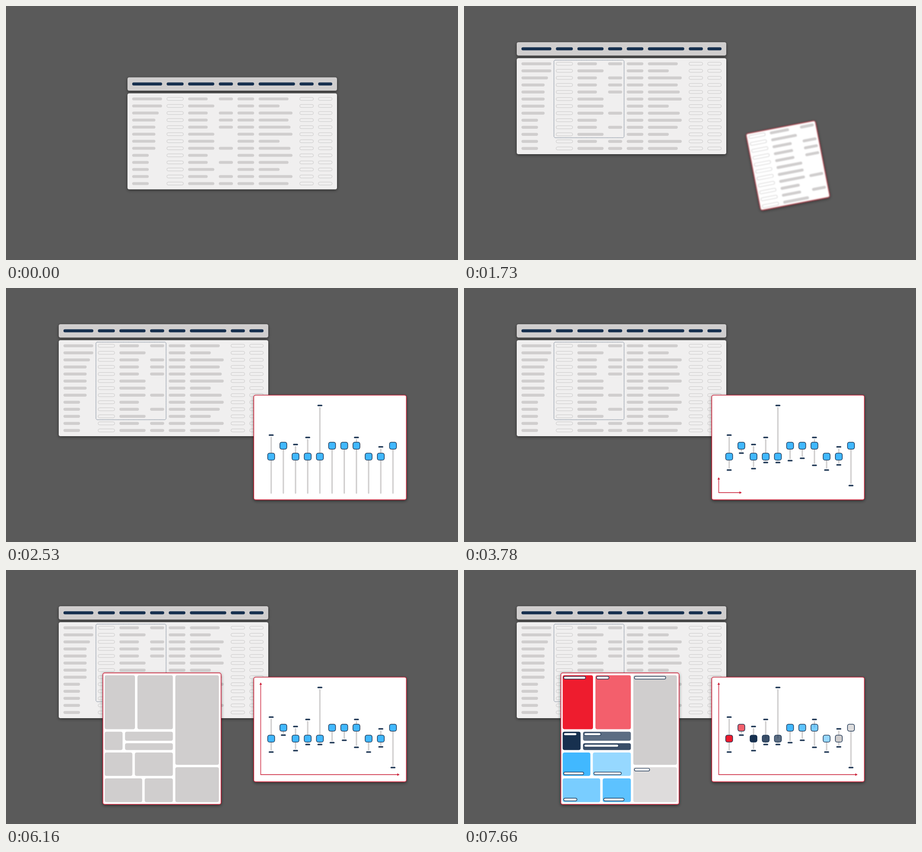
These frames come from a looping animation (960x540 px, 8 s). An HTML page:

```html
<!DOCTYPE html>
<html lang="en">
<head>
<meta charset="utf-8">
<title>Table to charts</title>
<style>
  html, body { margin: 0; width: 100%; height: 100%; overflow: hidden; background: #5a5a5a; }
  svg { display: block; width: 100vw; height: 100vh; }
</style>
</head>
<body>
<svg viewBox="0 0 960 540">
  <defs>
    <filter id="shadow" x="-10%" y="-20%" width="120%" height="145%">
      <feDropShadow dx="0" dy="2" stdDeviation="3" flood-color="#000" flood-opacity=".5"/>
    </filter>
    <filter id="tableBlur"><feGaussianBlur stdDeviation="0"/></filter>
    <filter id="cardBlur"><feGaussianBlur stdDeviation="0"/></filter>
  </defs>
  <g id="table">
    <g id="sheet"></g>
    <g id="marks"></g>
  </g>
  <g id="card"></g>
  <g id="map"></g>
</svg>
<script>
const LOOP = 8000, STEP = 50, ROWS = 13, PICKED = 11;
const GREY = '#d0cece', NAVY = '#17304f', BLUE = '#41b8ff', RED = '#ee1c2e';
const LINE = '#cc2039', PAPER = '#f0efef', WHITE = '#ffffff';
const SEL = { x: 191, y: 115, w: 149, h: 165 };
const MID = { x: SEL.x + SEL.w / 2, y: SEL.y + SEL.h / 2 };

const $ = id => document.getElementById(id);
const each = (n, draw) => Array.from({ length: n }, (_, i) => draw(i)).join('');
const lerp = (a, b, p) => a + (b - a) * p;
const lerpAll = (a, b, p) => a.map((v, k) => lerp(v, b[k], p));
const mix = (a, b, p) => {
  const part = (c, k) => parseInt(c.slice(1 + 2 * k, 3 + 2 * k), 16);
  return `rgb(${[0, 1, 2].map(k => Math.round(lerp(part(a, k), part(b, k), p)))})`;
};

const ease = (u, e) => u < .5 ? .5 * (2 * u) ** e : 1 - .5 * (2 - 2 * u) ** e;
// Share of a stepped move whose first and last changes fall at the given times
const share = (t, first, last) => {
  const n = Math.round((last - first) / STEP) + 1;
  return Math.max(0, Math.min(n, Math.floor((t - first) / STEP) + 1)) / n;
};
const move = (t, first, last, e = 2) => ease(share(t, first, last), e);

// Columns follow each other with an even gap
let edge = 122;
const COLS = [63.6, 36, 55.6, 30, 35.4, 77.2, 30, 30].map(w => {
  const x = edge;
  edge += w + 9.6;
  return { x, w };
});
const [NAME, TAG, BAR, EXTRA, CODE, NOTE, ...FLAGS] = COLS;

// Cell widths count letters
const LETTER = 7.05;
const LONG = new Set([1, 5, 6, 7, 10, 12]);
const BARE = new Set([1, 5, 6, 8, 10]);
const rowY = i => 122.8 + 15 * i;
const barLen = i => LETTER * (LONG.has(i) ? 7.9 : 5.9);
const nameLen = i => LETTER * Math.max(i < 8 ? 7 : 5, Math.round(9.4 - .7 * i));
const noteLen = i => LETTER * (Math.abs((2 * i + 1) % 9 - 3.5) < 1 ? 6.3 : 9 + .6 * (i % 3));

// Shades: each family fades as it goes on
const SHADES = [[RED, 2], [NAVY, 3], [BLUE, 4], [GREY, 2]].flatMap(([base, n]) =>
  Array.from({ length: n }, (_, k) => ({ base, alpha: 1 - k * (n > 2 ? .15 : .3) })));

// Treemap: nested rows and columns, each area in proportion to its value
const VALUES = [83, 96, 19, 21, 26, 35, 36, 47, 47, 190, 77];
const TREE = [[[0, 1], [2, [4, 3]], [5, 8], [7, 6]], [9, 10]];
const GAP = 5.2;
const TILES = [];
const sum = node => Array.isArray(node) ? node.reduce((s, n) => s + sum(n), 0) : VALUES[node];
function slice(node, x, y, w, h, across = true) {
  if (!Array.isArray(node)) {
    TILES[node] = [x + GAP / 2, y + GAP / 2, w - GAP, h - GAP];
    return;
  }
  const total = sum(node);
  for (const child of node) {
    const part = sum(child) / total;
    const cw = across ? w * part : w, ch = across ? h : h * part;
    slice(child, x, y, cw, ch, !across);
    if (across) x += cw; else y += ch;
  }
}
slice(TREE, 207, 221.2, 247.7, 274.8);

// Chart: whisker ends around each knob
const HIGH = { 0: 313, 2: 333, 3: 318, 4: 250, 7: 318, 9: 338 };
const LOW = [387, 351, 384, 371, 371, 367, 362, 377, 387, 376, 420];

const rect = (x, y, w, h, r, attrs) =>
  `<rect x="${x}" y="${y}" width="${w}" height="${h}" rx="${r}" ${attrs}/>`;
const pill = (x, cy, w, fill = GREY, h = 6.2) => rect(x, cy - h / 2, w, h, h / 2, `fill="${fill}"`);
const hollow = ({ x, w }, cy) => rect(x + .4, cy - 3.2, w - .8, 6.4, 3.2, 'fill="none" stroke="#cbcaca"');
const panel = (x, y, w, h, fill) =>
  rect(x, y, w, h, 4, `fill="${fill}" stroke="${LINE}" stroke-width="1.4" filter="url(#shadow)"`);
const side = i => hollow(TAG, rowY(i)) + (BARE.has(i) ? '' : pill(EXTRA.x, rowY(i), EXTRA.w));
const bar = i => pill(BAR.x, rowY(i), barLen(i));

$('sheet').innerHTML =
  rect(112, 77, 445, 28.3, 4, `fill="${GREY}" filter="url(#shadow)"`) +
  rect(112, 111, 445, 204, 4, `fill="${PAPER}" filter="url(#shadow)"`) +
  COLS.map(({ x, w }) => pill(x, 91, w, NAVY, 6.5)).join('') +
  each(ROWS, i => {
    const y = rowY(i);
    return pill(NAME.x, y, nameLen(i)) + side(i) + bar(i) + pill(CODE.x, y, CODE.w) +
      pill(NOTE.x, y, noteLen(i)) + FLAGS.map(col => hollow(col, y)).join('');
  });

// Red outline growing both ways from the top right corner
function trace(p) {
  const { x, y, w, h } = SEL, r = x + w, b = y + h;
  const style = `fill="none" stroke="${LINE}" stroke-width="1.5" pathLength="1" stroke-dasharray="${p} 2"`;
  return `<path d="M${r - 1} ${y + 1}Q${r - 2} ${y} ${r - 4} ${y}H${x + 3}Q${x} ${y} ${x} ${y + 3}V${b - 1}" ${style}/>` +
    `<path d="M${r - 1} ${y + 1}Q${r} ${y + 2} ${r} ${y + 4}V${b - 3}Q${r} ${b} ${r - 3} ${b}H${x + 1}" ${style}/>`;
}

function marks(t) {
  const { x, y, w, h } = SEL;
  let out = '';
  if (t >= 630) out += rect(x, y, w, h, 3, `fill="none" stroke="${NAVY}" stroke-dasharray="1 1.2"`);
  if (t >= 330 && t < 930) out += trace(move(t, 330, 630, 1.25));
  if (t >= 5360 && t < 5910) out += trace(move(t, 5360, 5710, 1.25));
  return out;
}

function copy(t, slide) {
  const { x, y, w, h } = SEL;
  const turn = -90 * move(t, 1730, 1930, 1.54);
  return `<g transform="translate(${lerp(146, 422.5, slide)} ${lerp(74.7, 141.5, slide)}) rotate(${turn} ${MID.x} ${MID.y})">` +
    panel(x, y, w, h, mix(PAPER, WHITE, Math.max(0, slide * 2 - 1))) +
    each(PICKED, i => side(i) + bar(i)) + '</g>';
}

// A row turned upright becomes a knob with whiskers
function column(i, m, s, c) {
  const x = lerp(614 + 15 * i, 563.2 + 25.87 * i, m);
  const box = (cy, w, h, r, attrs) => rect(x - w / 2, cy - h / 2, w, h, r, attrs);
  const len = barLen(i), { base, alpha } = SHADES[i];
  const goal = LONG.has(i) ? 335.2 : 358.5;
  const knob = lerp(363.5 - len / 2, goal, m);
  const thin = lerp(6.4, 2.9, m);

  const from = lerp(373.5, goal + 7, m);
  const to = Math.max(from, lerp(lerp(408.5, 437.5, m), LOW[i] - 3, s));
  let out = box((from + to) / 2, thin, to - from, thin / 2,
    `fill="${GREY}" fill-opacity="${m}" stroke="${GREY}" stroke-opacity="${1 - m}"`);

  if (!BARE.has(i) && i in HIGH) {
    const cap = lerp(283.3, HIGH[i], m) - .3 * m, start = cap + 3.5;
    out += box((start + knob) / 2, 2.9, knob - start, 1.4, `fill="${GREY}" opacity="${m}"`);
    out += box(cap, lerp(6.2, 10.6, m), lerp(EXTRA.w, 3, m), lerp(3.1, 1.5, m), `fill="${mix(GREY, NAVY, m)}"`);
  }
  if (s > 0) out += box(lerp(437, LOW[i], s), 10.6, 3, 1.5, `fill="${NAVY}" opacity="${Math.min(1, s * 3)}"`);

  return out + box(knob, lerp(6.2, 14.8, m), lerp(len, 14.8, m), lerp(3.1, 4, m),
    `fill="${c ? mix(BLUE, base, c) : mix(GREY, BLUE, m)}" fill-opacity="${lerp(1, alpha, c)}" ` +
    `stroke="${NAVY}" stroke-width="1.3" stroke-opacity="${m}"`);
}

function axes(p) {
  const y = lerp(435, 240, p), x = lerp(541, 835, p);
  return `<path d="M541 ${y + 3}V435H${x - 3}" fill="none" stroke="${LINE}" stroke-width="1.3"/>` +
    `<path d="M541 ${y - 1}l2.7 5h-5.4zM${x + 1} 435l-5 -2.7v5.4z" fill="${LINE}"/>`;
}

function chart(t) {
  const m = move(t, 2130, 2530), s = move(t, 3030, 3530);
  const a = move(t, 3730, 4030), c = move(t, 6660, 6960);
  const w = lerp(SEL.h, 324, m), h = lerp(SEL.w, 222.4, m);
  return panel(688.3 - w / 2, 339.1 - h / 2, w, h, WHITE) +
    (a ? axes(a) : '') + each(PICKED, i => column(i, m, s, c));
}

function label(i, p) {
  const [x, y, w, h] = TILES[i];
  const full = w * (i % 3 === 1 ? .35 : .72);
  const top = SHADES[i].base === BLUE ? y + h - 8.2 : y + 2.4;
  return rect(x + 2.3, top, lerp(6, full, p), 5.6, 2.8,
    `fill="${WHITE}" stroke="${NAVY}" stroke-width="1.2" opacity="${Math.min(1, p * 3)}"`);
}

function treemap(t) {
  const u = move(t, 5910, 6160), c = move(t, 6660, 6960), l = move(t, 7460, 7660);
  const [x, y, w, h] = lerpAll([SEL.x, SEL.y, SEL.w, SEL.h], [205.8, 218.8, 250.9, 279.4], u);
  const k = w / SEL.w;
  const rest = u < 1
    ? `<g opacity="${1 - u}" transform="translate(${x - SEL.x * k} ${y - SEL.y * k}) scale(${k})">${each(PICKED, side)}</g>`
    : '';
  return panel(x, y, w, h, mix(PAPER, WHITE, u)) + rest +
    each(PICKED, i => {
      const { base, alpha } = SHADES[i];
      const tile = lerpAll([BAR.x, rowY(i) - 3.1, barLen(i), 6.2], TILES[i], u);
      return rect(...tile, lerp(3.1, 4, u), `fill="${mix(GREY, base, c)}" fill-opacity="${lerp(1, alpha, c)}"`);
    }) +
    (l ? each(PICKED, i => label(i, l)) : '');
}

function blur(group, id, x, y) {
  if (x < .05) return $(group).removeAttribute('filter');
  $(id).firstElementChild.setAttribute('stdDeviation', `${x} ${y}`);
  $(group).setAttribute('filter', `url(#${id})`);
}

function render(t) {
  const part = share(t, 930, 1230), slide = ease(part, 2.3), drift = 1 - ease(part, 2.4);
  const spin = share(t, 1730, 1930);
  $('table').setAttribute('transform', `translate(${146 * drift} ${74.7 * drift})`);
  $('marks').innerHTML = marks(t);
  $('card').innerHTML = t < 930 ? '' : t < 2130 ? copy(t, slide) : chart(t);
  $('map').innerHTML = t < 5910 ? '' : treemap(t);
  const speed = 4 * part * (1 - part), whirl = 5 * spin * (1 - spin);
  blur('table', 'tableBlur', speed, speed * .3);
  blur('card', 'cardBlur', 2 * speed + whirl, .3 * speed + whirl);
}

// Redraw only when the 10 ms clock has moved on
const begin = performance.now();
let shown = -1;
function tick() {
  const t = Math.floor((performance.now() - begin) % LOOP / 10) * 10;
  if (t !== shown) render(shown = t);
  requestAnimationFrame(tick);
}
tick();
</script>
</body>
</html>
```
